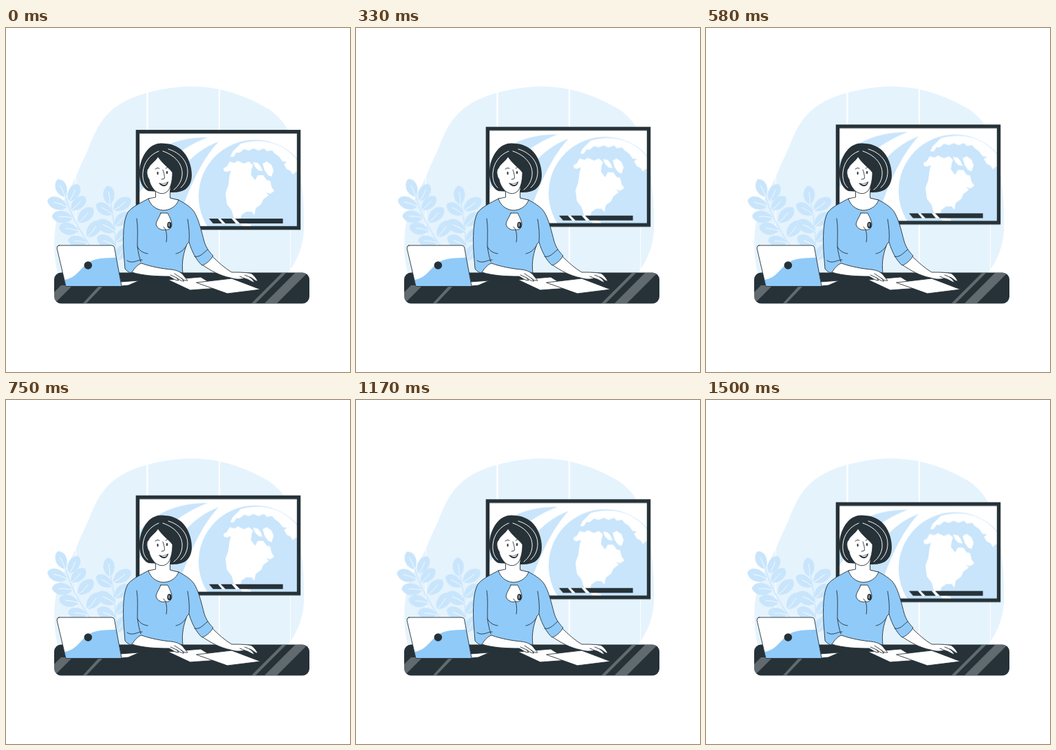
Write an HTML page without scripts that moves like this. It is 500 by 500 pixels and loops after 1540 ms.

```html
<!DOCTYPE html>
<html lang="en">
<head>
<meta charset="utf-8">
<title>News desk</title>
<style>
  html, body { margin: 0; width: 100%; height: 100%; overflow: hidden; background: #fff; }
  svg { display: block; width: 100%; height: 100%; }
  .ink { fill: #263238; }
  .blue { fill: #90caf9; }
  .pale { fill: #c8e5fc; }
  .mist { fill: #e5f3fd; }
  .white { fill: #fff; }
  .shine { fill: #fff; fill-opacity: .27; }
  .line { stroke: #263238; stroke-width: .9; stroke-linejoin: round; stroke-linecap: round; }
  .open { fill: none; }
  .strand { fill: none; stroke: #fff; stroke-width: 1; stroke-linecap: round; }
  .stem { fill: none; stroke: #c8e5fc; stroke-width: 1.4; }
  .vein { fill: none; stroke: #fff; stroke-width: .7; }
  .screen { animation: hover 1540ms linear -42ms infinite; }
  .plant { transform-origin: 140px 352px; animation: sway 1540ms linear infinite; }
  @keyframes hover {
    0%, 100% { transform: translateY(.6px); }
    50% { transform: translateY(-9.6px); }
  }
  @keyframes sway {
    0%, 50%, 100% { transform: rotate(0deg); }
    25% { transform: rotate(.45deg); }
    75% { transform: rotate(-.45deg); }
  }
</style>
</head>
<body>
<svg viewBox="0 0 500 500">
  <defs>
    <g id="leaf">
      <path class="pale" d="M0 0C-11-6-12-22-2-28C9-27 11-9 0 0Z"/>
      <path class="vein" d="M0 0Q1-10-1-19"/>
    </g>
    <clipPath id="glass"><rect x="191" y="150" width="235" height="141"/></clipPath>
    <clipPath id="desk"><rect x="70" y="355.5" width="371" height="45" rx="10"/></clipPath>
  </defs>

  <!-- backdrop -->
  <path class="mist" d="M77 362C69 338 68 300 75 273C83 246 99 226 107 203C113 190 117 182 121 172C132 144 144 119 180 103C205 92 240 85 271 85C312 85 350 99 382 118C412 138 423 172 428 212C432 240 434 268 433 295C431 322 421 343 405 362Z"/>
  <g class="white">
    <rect x="100.8" y="190" width="1" height="166"/>
    <rect x="204.2" y="85" width="2.4" height="80"/>
    <rect x="309" y="85" width="2.2" height="272"/>
    <rect x="412.8" y="130" width="1" height="226"/>
  </g>

  <g class="plant">
    <path class="stem" d="M141 352C128 318 99 292 86 244M158 356C162 320 158 280 151 250"/>
    <use href="#leaf" transform="translate(86 246) rotate(-20)"/>
    <use href="#leaf" transform="translate(92 252) rotate(30)"/>
    <use href="#leaf" transform="translate(89 260) rotate(-68) scale(1.08)"/>
    <use href="#leaf" transform="translate(95 265) rotate(48)"/>
    <use href="#leaf" transform="translate(97 276) rotate(-82) scale(1.08)"/>
    <use href="#leaf" transform="translate(105 283) rotate(47) scale(1.08)"/>
    <use href="#leaf" transform="translate(106 295) rotate(-76) scale(1.05)"/>
    <use href="#leaf" transform="translate(118 304) rotate(42) scale(1.08)"/>
    <use href="#leaf" transform="translate(118 312) rotate(-80)"/>
    <use href="#leaf" transform="translate(128 326) rotate(-78)"/>
    <use href="#leaf" transform="translate(151 257) rotate(-3)"/>
    <use href="#leaf" transform="translate(156 265) rotate(58) scale(1.08)"/>
    <use href="#leaf" transform="translate(155 271) rotate(-55)"/>
    <use href="#leaf" transform="translate(158 288) rotate(48)"/>
    <use href="#leaf" transform="translate(159 296) rotate(-58) scale(1.1)"/>
    <use href="#leaf" transform="translate(160 311) rotate(48)"/>
    <use href="#leaf" transform="translate(160 318) rotate(-60) scale(1.1)"/>
    <use href="#leaf" transform="translate(160 338) rotate(35)"/>
  </g>

  <g class="screen">
    <rect class="white" x="191" y="150.5" width="235" height="140.3"/>
    <g clip-path="url(#glass)">
      <path class="pale" d="M293 159C255 158 212 172 190 206V246C212 210 248 176 293 159Z"/>
      <path class="pale" d="M309 165C268 181 241 214 230 265H255C271 222 286 190 309 165Z"/>
      <circle class="pale" cx="362" cy="244.5" r="82"/>
      <g class="white">
        <path d="M326 187L329 180L335 174L341 168C378 157 410 171 428 198V211L421 209L417 213L413 207L409 195L402 194L397 187L390 182L387 178L379 179L375 175L367 178L360 175L353 178L346 176L340 181L335 181L331 187Z"/>
        <path d="M316 204L321 201L325 194L332 196L337 193L346 197L353 194L359 199L357 205L356 213L362 221L366 214L374 214L379 221L384 222L386 231L390 237L384 241L378 239L382 243L374 249L371 256L363 262L361 272L357 267L349 267L342 272L341 277L346 283L356 286V292L344 288L337 280L331 276L328 265L321 256L319 240L323 229L325 214L327 207L321 209L317 208Z"/>
        <path d="M359 195L366 196L370 201L373 208L367 207L362 202Z"/>
        <path d="M373 197L379 194L386 199L389 207L386 216L381 214L376 207Z"/>
        <path d="M404 198L410 194L416 202L414 208L408 205Z"/>
      </g>
      <path class="white" d="M308 277H312L319 284H314ZM328 277H333L340 284H334Z"/>
      <path class="ink" d="M295 277H308L314 284H301ZM312 277H328L334 284H319ZM333 277H402.5V284H340Z"/>
    </g>
    <rect fill="none" stroke="#263238" stroke-width="5.4" x="191.4" y="150.7" width="234.1" height="139.9"/>
  </g>

  <!-- desk -->
  <g clip-path="url(#desk)">
    <rect class="ink" x="70" y="355" width="371" height="46"/>
    <path class="shine" d="M70 384L80 374H97L73 398L70 395ZM112 400H117L140 376H134ZM357 400H363L407 356H401ZM376 400H394L438 356H420Z"/>
  </g>

  <!-- papers -->
  <path class="white line" d="M236 366L283 362L309 378L268 381Z"/>
  <path class="white line" d="M277 370L328 364L370 380L322 386Z"/>

  <!-- right forearm -->
  <path class="white line" d="M285 344L300 332C309 341 318 349 328 355C339 355 350 355 357 357C361 360 364 364 366 368C361 368 359 363 354 362C358 365 360 367 361 370C355 368 351 364 346 364C339 366 332 365 326 363C311 360 298 353 285 344Z"/>
  <path class="line open" d="M347 359L354 362M340 361L347 364"/>

  <!-- dress -->
  <path class="blue line" d="M207 248C196 254 183 260 177 268C170 280 170 305 171 325L173 350C178 356 183 357 187 355L197 344C220 350 238 351 257 356C255 340 258 327 263 314L266 311C270 325 277 338 285 345C291 343 297 338 301 331C294 324 290 317 288 310C284 295 281 282 276 272C272 262 262 256 251 250Z"/>
  <path class="line open" d="M190 277C192 289 191 303 191 317C192 326 194 334 196 340M191 318C195 325 200 327 206 328M262 317C257 324 252 327 247 328M264 278C266 290 267 300 266 311M176 338C184 344 192 336 198 337M274 332C281 334 286 328 293 322M232 293C234 300 234 305 233 311"/>

  <!-- left forearm -->
  <path class="white line" d="M183 355C187 349 192 343 197 342C211 347 228 350 240 351C250 352 256 356 259 361L264 367C260 368 257 365 254 363L259 368C254 368 251 365 248 363L251 367C245 367 242 363 237 361C219 361 198 360 183 355Z"/>
  <path class="line open" d="M245 357L254 363M239 359L248 363"/>

  <!-- hair, neck and face -->
  <path class="ink" d="M215 170C220 167 227 167 232 168C240 168 249 172 255 177C265 186 270 201 270 214C270 225 265 233 258 236C251 239 245 239 238 239L207 237C198 233 193 221 194 208C195 190 204 175 215 170Z"/>
  <path class="white" d="M217.500 230H238.500V248L251 250C247 260 238 265 228 265C218 264 210 258 207 248L217.500 246Z"/>
  <path class="line open" d="M217.500 234V246L207 248C210 258 218 264 228 265C238 265 247 260 251 250L238.500 247V236"/>
  <path class="white line" d="M221 187C216 195 209 198 207 204C204 205 204 215 208 220C209 226 212 232 217 237C224 242 231 242 236 236C240 230 242 220 242 210C237 203 227 197 221 187Z"/>
  <path class="strand" d="M222 179C209 184 200 196 199 210C198 220 201 228 206 232M228 179C243 184 255 195 256 209C257 220 251 230 244 235M236 176C253 181 264 194 264 209C264 219 260 227 254 232"/>
  <path class="line open" d="M228 206C230 212 231 217 230 219L226 220M217 205Q220 202 223 204M232 204Q235 201 238 203"/>
  <ellipse class="ink" cx="220.500" cy="211" rx="1.100" ry="2.200"/>
  <ellipse class="ink" cx="234" cy="210" rx="1.100" ry="2.200"/>
  <path class="ink" d="M222 225C227 227 232 226 236 223C235 232 226 232 222 225Z"/>
  <path class="white" d="M225 226.500Q230 227 234 225L233 227Q229 229 225 226.500Z"/>

  <!-- keyhole and microphone -->
  <path class="white line" d="M225 269H235C238 275 241 281 241 286C240 292 236 294 232 293C226 295 219 291 218 285C219 279 223 275 225 269Z"/>
  <path class="line open" d="M229 289L232 293"/>
  <ellipse class="ink" cx="237.500" cy="286.500" rx="3.200" ry="4.800"/>
  <path class="strand" d="M237 284V288"/>

  <!-- laptop -->
  <path class="white line" d="M166 369L194 367L178 374L168 375Z"/>
  <path class="white" d="M77 316H154Q157 316 157.500 319L168 375.500H87L74 320Q74 316 77 316Z"/>
  <path class="blue" d="M84.500 366C101 364 107 351 117 343C129 333 145 335 160.500 333.500L168 375H87Z"/>
  <path class="line open" d="M77 316H154Q157 316 157.500 319L168 375.500H87L74 320Q74 316 77 316Z"/>
  <circle class="ink" cx="119.300" cy="345" r="5.800"/>
</svg>
</body>
</html>
```
